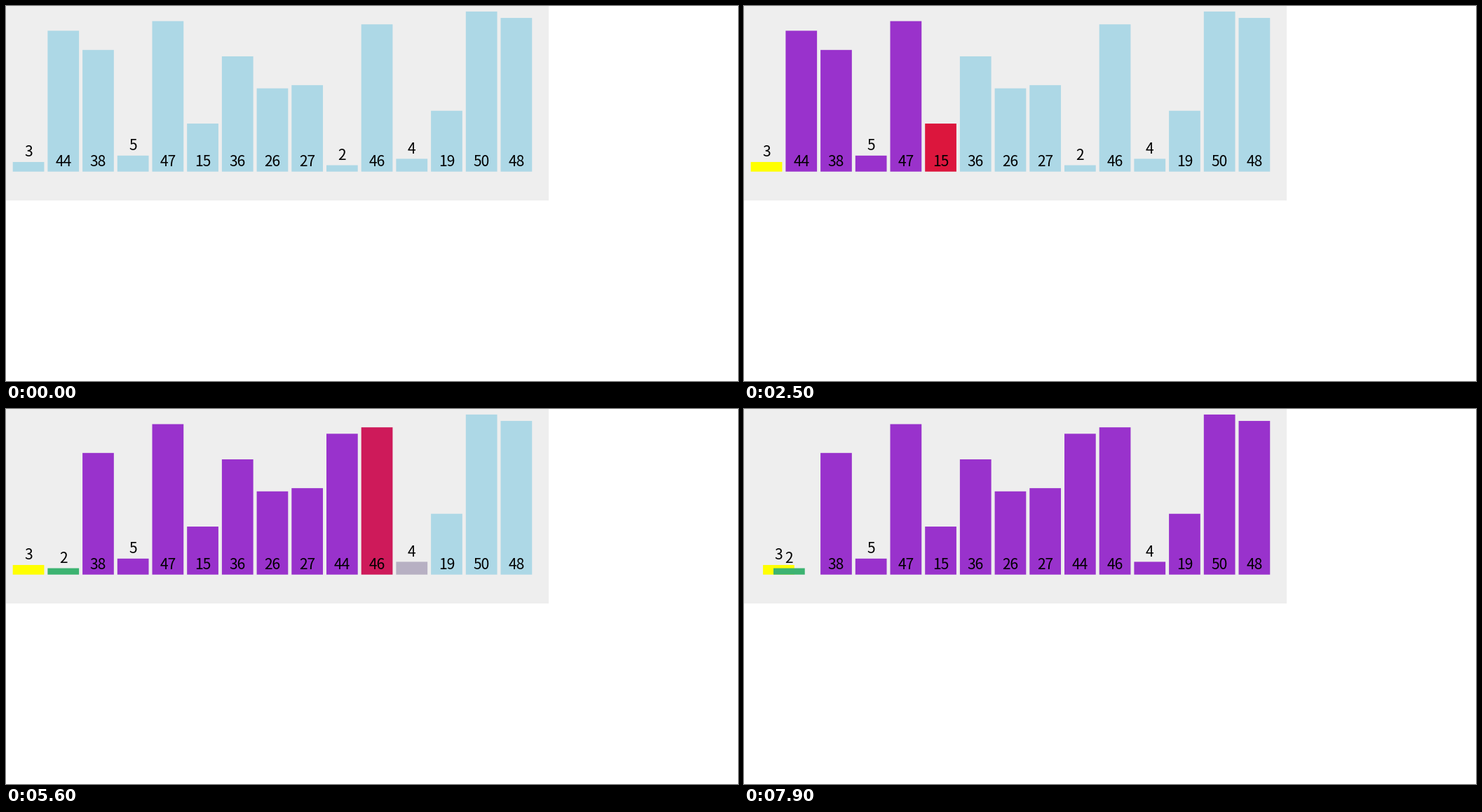
Recreate the animation shown at these times as a matplotlib script. Size 1044 by 536 pixels, loop 8000 ms.

```python
import matplotlib.pyplot as plt
from matplotlib.animation import FuncAnimation
from matplotlib.colors import to_rgb
from matplotlib.patches import Rectangle
import numpy as np

WIDTH, HEIGHT, DPI = 1044, 536, 100
FRAMES, INTERVAL = 80, 100

VALUES = [3, 44, 38, 5, 47, 15, 36, 26, 27, 2, 46, 4, 19, 50, 48]
LEFT, PITCH, BAR_W = 9.7, 49.7, 44.73
BASE, UNIT = 236.7, 4.576
LABEL_GAP, LABEL_PX = 7.7, 21

# Milliseconds: first step, time between steps, length of each transition
START, STEP, DURATION = 40.5, 457.1, 200

IDLE, PIVOT, CURRENT, SMALLER, LARGER = (
    np.array(to_rgb(name)) for name in
    ("lightblue", "yellow", "crimson", "mediumseagreen", "darkorchid"))


def partition_states():
    """Slot and colour of every bar after each step of the partition."""
    order = list(range(len(VALUES)))
    colors = [IDLE] * len(VALUES)
    states = []

    def push():
        slots = np.argsort(order).astype(float)
        states.append((slots, np.array(colors)))

    def swap(a, b):
        order[a], order[b] = order[b], order[a]
        push()

    push()
    colors[0] = PIVOT
    push()
    store = 0
    for k in range(1, len(VALUES)):
        bar = order[k]
        colors[bar] = CURRENT
        push()
        if VALUES[bar] < VALUES[0]:
            store += 1
            swap(k, store)
            colors[bar] = SMALLER
        else:
            colors[bar] = LARGER
    push()
    swap(0, store)
    return states


def cubic_in_out(u):
    u = min(max(u, 0), 1)
    return 4 * u ** 3 if u < 0.5 else 1 - 4 * (1 - u) ** 3


STATES = partition_states()

fig = plt.figure(figsize=(WIDTH / DPI, HEIGHT / DPI), dpi=DPI, facecolor="white")
ax = fig.add_axes([0, 0, 1, 1])
ax.set_xlim(0, WIDTH)
ax.set_ylim(HEIGHT, 0)
ax.axis("off")
ax.add_patch(Rectangle((0, 0), 774.3, 278, fc="#eeeeee", lw=0, zorder=0))

bars, labels = [], []
for i, value in enumerate(VALUES):
    top = BASE - value * UNIT
    bar = Rectangle((0, top), BAR_W, value * UNIT, lw=0, snap=False, zorder=i + 1)
    bars.append(ax.add_patch(bar))
    foot = BASE if value > 10 else top
    labels.append(ax.text(0, foot - LABEL_GAP, str(value), ha="center",
                          va="baseline", color="black",
                          family="Noto Sans CJK JP",
                          fontsize=LABEL_PX * 72 / DPI, zorder=i + 1.5))


def draw(frame):
    elapsed = frame * INTERVAL - START
    step = int(max(elapsed, 0) // STEP)
    t = cubic_in_out((elapsed - step * STEP) / DURATION)
    (slots0, colors0), (slots1, colors1) = STATES[step:step + 2]
    xs = LEFT + PITCH * (slots0 + (slots1 - slots0) * t)
    colors = colors0 + (colors1 - colors0) * t
    for bar, label, x, color in zip(bars, labels, xs, colors):
        bar.set_x(x)
        bar.set_facecolor(color)
        label.set_x(x + BAR_W / 2)
    return bars + labels


anim = FuncAnimation(fig, draw, frames=FRAMES, interval=INTERVAL,
                     repeat=True, repeat_delay=0, blit=False)
plt.show()
```
